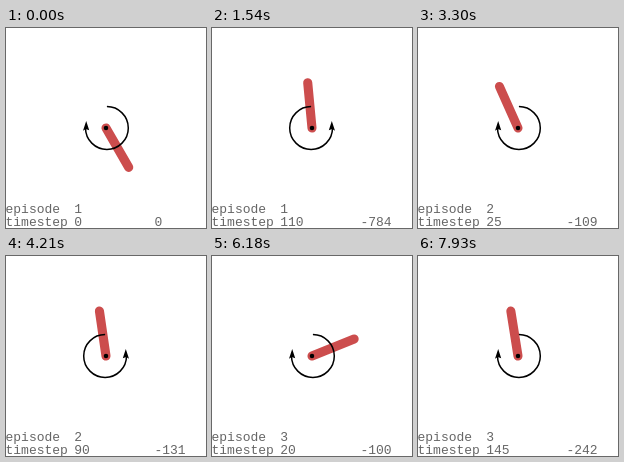
An HTML page with a canvas for the animation above (8 s loop, 200x200 px).

```html
<!DOCTYPE html>
<html lang="en">
<head>
<meta charset="utf-8">
<title>Pendulum</title>
<style>
  html, body { margin: 0; width: 100%; height: 100%; overflow: hidden; background: #fff; }
  canvas, svg { position: absolute; left: 0; top: 0; width: 200px; height: 200px; }
  text { font: 13px "Courier New", "Liberation Mono", monospace; fill: #666; white-space: pre; }
</style>
</head>
<body>
<canvas id="stage" width="200" height="200"></canvas>
<svg viewBox="0 0 200 200">
  <text x="-0.5" y="185">episode</text>
  <text x="68.2" y="185" id="episode">1</text>
  <text x="-0.5" y="198">timestep</text>
  <text x="68.2" y="198" id="step">0</text>
  <text x="148.4" y="198" id="score">0</text>
</svg>
<script>
const LOOP = 8000, EPISODE = 2950, TICK = 70, LAST = 39, STRIDE = 5;
const HALF = 20, RISE = 30;               // steps per half swing, and for the swing to the top
const ARRIVE = 5.4, REST = 10, CREEP = 60; // balancing angle in degrees, settling time in steps
const UPKEEP = 0.033, FALLOFF = 1.064;    // cost per balanced step, bend of the cost curve
const UNIT = 200 / 4.4;
const $ = id => document.getElementById(id);
const ctx = $('stage').getContext('2d');

// turns: angles in degrees from upright where the swing reverses; cost: spent until balanced
const episodes = [
  { turns: [210, 140, 220, 150, 275], cost: 784.19 },
  { turns: [284], cost: 129.1 },
  { turns: [120, 292], cost: 239 }
];

const ease = p => (1 - Math.cos(Math.PI * p)) / 2;
const settleStep = ep => (ep.turns.length - 1) * HALF + RISE;

function pose(ep, step) {
  const { turns } = ep, over = step - settleStep(ep);
  if (over >= 0) {
    return {
      angle: REST - (REST - ARRIVE) * Math.exp(-over / CREEP),
      torque: over / STRIDE % 2 ? -1 : 1
    };
  }
  const k = Math.min(turns.length - 1, Math.floor(step / HALF));
  const last = k === turns.length - 1;
  const from = turns[k], to = last ? ARRIVE : turns[k + 1];
  const p = (step - k * HALF) / (last ? RISE : HALF);
  return { angle: from + (to - from) * ease(p), torque: Math.sign(to - from) };
}

function totalCost(ep, step) {
  const settle = settleStep(ep);
  const left = Math.max(0, 1 - step / settle);
  return ep.cost * (1 - left ** FALLOFF) + UPKEEP * Math.max(0, step - settle);
}

function drawRod(deg) {
  const th = deg * Math.PI / 180;
  ctx.strokeStyle = '#cc4d4d';
  ctx.lineWidth = UNIT * 0.2;
  ctx.lineCap = 'round';
  ctx.beginPath();
  ctx.moveTo(0, 0);
  ctx.lineTo(-UNIT * Math.sin(th), -UNIT * Math.cos(th));
  ctx.stroke();
  ctx.fillStyle = '#000';
  ctx.beginPath();
  ctx.arc(0, 0, UNIT * 0.05, 0, 2 * Math.PI);
  ctx.fill();
}

// Drawn clockwise; mirrored for positive torque
function drawArrow(sign) {
  ctx.save();
  ctx.scale(-sign, 1);
  ctx.strokeStyle = ctx.fillStyle = '#000';
  ctx.lineWidth = 1.5;
  ctx.lineCap = 'butt';
  ctx.beginPath();
  ctx.arc(0.9, 0, 21.4, -Math.PI / 2, Math.PI);
  ctx.stroke();
  ctx.beginPath();
  ctx.moveTo(-19.8, -7);
  ctx.lineTo(-23, 2.8);
  ctx.lineTo(-20.2, 1);
  ctx.lineTo(-16.8, 2.3);
  ctx.fill();
  ctx.restore();
}

function setText(id, value) {
  const el = $(id), s = String(value);
  if (el.textContent !== s) el.textContent = s;
}

function draw(now) {
  const t = now % LOOP;
  const n = Math.floor(t / EPISODE);
  const ep = episodes[n];
  const step = STRIDE * Math.min(LAST, Math.floor((t - n * EPISODE) / TICK));
  const { angle, torque } = pose(ep, step);
  const cost = Math.floor(totalCost(ep, step));

  ctx.setTransform(1, 0, 0, 1, 0, 0);
  ctx.fillStyle = '#fff';
  ctx.fillRect(0, 0, 200, 200);
  ctx.translate(100, 100);
  drawRod(angle);
  drawArrow(torque);

  setText('episode', n + 1);
  setText('step', step);
  setText('score', cost ? '-' + cost : '0');
}

const start = performance.now();
function loop() {
  draw(performance.now() - start);
  requestAnimationFrame(loop);
}
loop();
</script>
</body>
</html>
```
